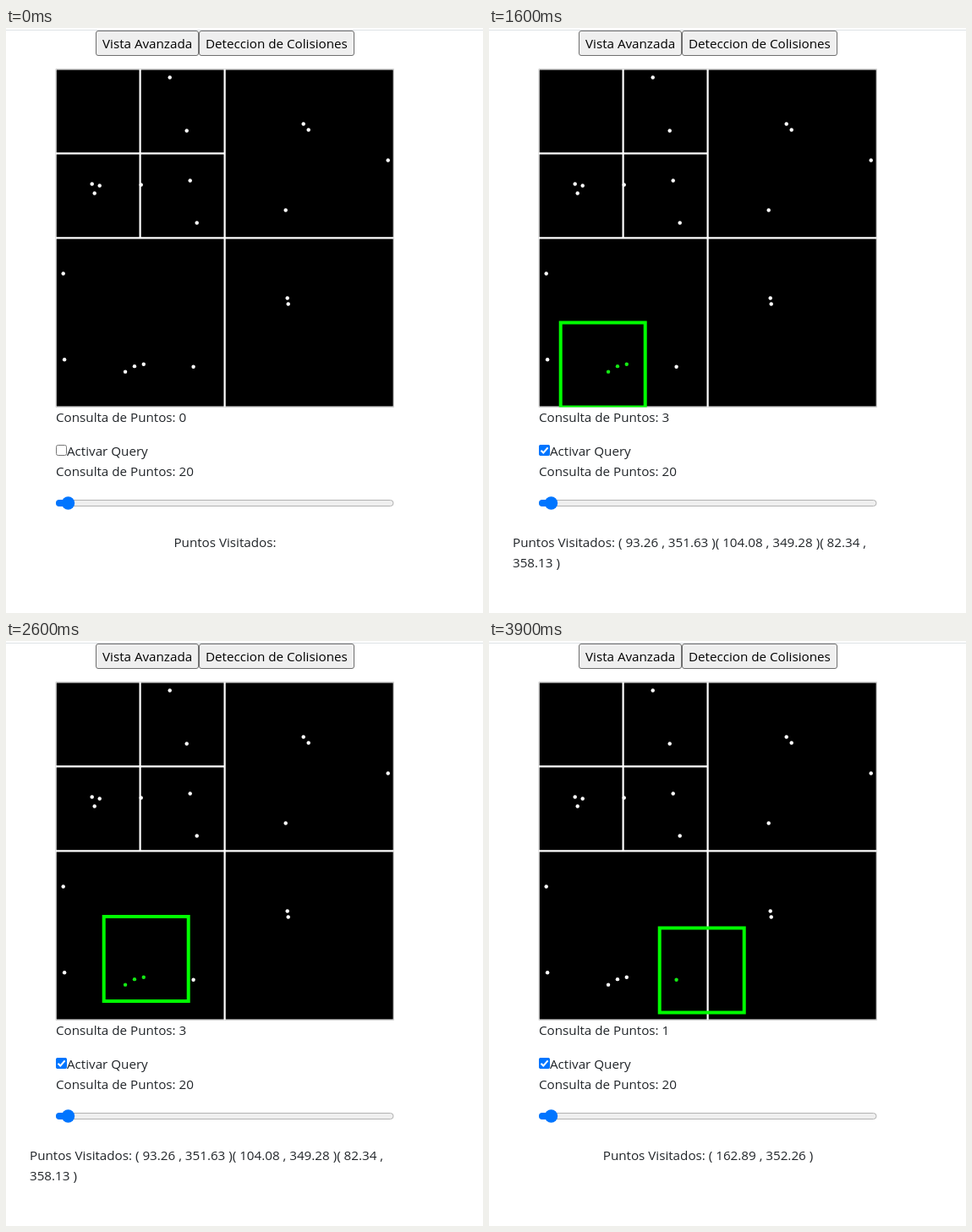
Write an HTML page that moves like this. It is 564 by 692 pixels and loops after 4 s.

```html
<!DOCTYPE html>
<html lang="es">
<head>
<meta charset="utf-8">
<title>Quadtree</title>
<style>
html, body { margin: 0; width: 100%; height: 100%; overflow: hidden; background: #fff; }
body { position: relative; font: 15.2px/24px "Open Sans", "Noto Sans", sans-serif; color: #212529; }
svg { position: absolute; left: 0; top: 0; }
svg text { fill: #212529; white-space: pre; }
svg .btn text { fill: #000; }
.btn rect { fill: #efefef; stroke: #6f6f6f; }
#visited { position: absolute; left: 28px; top: 596px; width: 462px; display: flex; justify-content: center; }
</style>
</head>
<body>
<svg width="564" height="692" viewBox="0 0 564 692">
  <path d="M0 2.5H564" stroke="#dee2e6"/>
  <g class="btn">
    <rect x="106.5" y="3.5" width="121" height="29" rx="2.5"/>
    <text x="114" y="24">Vista Avanzada</text>
    <rect x="228.5" y="3.5" width="183" height="29" rx="2.5"/>
    <text x="236" y="24">Deteccion de Colisiones</text>
  </g>

  <svg x="58.7" y="48.5" width="400" height="400">
    <g id="cells" stroke="#fff" stroke-width="2"></g>
    <g id="dots"></g>
    <rect id="query" width="100" height="100" fill="none" stroke="#0f0" stroke-width="4"/>
  </svg>

  <text id="count" x="59" y="466"></text>

  <rect x="59.5" y="493.5" width="12" height="12" rx="2" fill="#fff" stroke="#767676"/>
  <g id="check">
    <rect x="59" y="493" width="13" height="13" rx="2" fill="#0075ff"/>
    <path d="M61.5 499.7L64.3 502.5L69.6 496.3" fill="none" stroke="#fff" stroke-width="2"/>
  </g>
  <text x="72" y="506">Activar Query</text>
  <text x="59" y="530">Consulta de Puntos: 20</text>

  <rect x="59.5" y="558.5" width="398.5" height="7" rx="3.5" fill="#efefef" stroke="#b2b2b2"/>
  <rect x="59" y="558" width="16" height="8" rx="4" fill="#0075ff"/>
  <circle cx="73.5" cy="562" r="7.7" fill="#0075ff"/>
</svg>
<div id="visited"><span></span></div>

<script>
const LOOP = 4000, STEP = 100, SIZE = 400, HALF = 50, CAPACITY = 6;
const CHECK_AT = 400, QUERY_AT = 600;

// Stored points, in the order the tree reports them
const points = [
  [10.41, 343.81], [162.89, 352.26], [93.26, 351.63], [104.08, 349.28], [82.34, 358.13],
  [135, 10], [155, 73], [43, 136], [52, 138], [46, 147], [101, 137], [159, 132], [167, 182],
  [293, 65], [299, 72], [393, 108], [272, 167], [9, 242], [274, 271], [275, 278]
];

// Pointer turns: time, x, y
const path = [
  [400, 7, 451], [800, 16, 432], [1100, 38, 385], [1600, 76, 350],
  [2000, 88, 338.5], [2600, 107, 327.5], [3400, 154, 331], [3900, 193, 341]
];

const $ = id => document.getElementById(id);
const query = $("query"), check = $("check"), count = $("count");
const visited = $("visited").firstElementChild;

function add(parent, tag, attrs) {
  const node = document.createElementNS("http://www.w3.org/2000/svg", tag);
  for (const name in attrs) node.setAttribute(name, attrs[name]);
  return parent.appendChild(node);
}

// Draws a cell and quarters it while it holds too many points
function drawCell(x, y, size) {
  add($("cells"), "rect", { x, y, width: size, height: size });
  const inside = points.filter(([px, py]) =>
    px >= x && px < x + size && py >= y && py < y + size);
  if (inside.length <= CAPACITY) return;
  const half = size / 2;
  for (let i = 0; i < 4; i++) drawCell(x + i % 2 * half, y + (i >> 1) * half, half);
}

drawCell(0, 0, SIZE);
const dots = points.map(([cx, cy]) => add($("dots"), "circle", { cx, cy, r: 2.2 }));

function pointer(t) {
  const i = Math.max(1, path.findIndex(p => p[0] >= t));
  const [t0, x0, y0] = path[i - 1], [t1, x1, y1] = path[i];
  const k = (t - t0) / (t1 - t0);
  return [x0 + (x1 - x0) * k, y0 + (y1 - y0) * k];
}

function show(node, on) {
  node.style.display = on ? "" : "none";
}

function draw(t) {
  const active = t >= QUERY_AT;
  const [mx, my] = pointer(t);
  show(check, t >= CHECK_AT);
  show(query, active);
  query.setAttribute("x", mx - HALF);
  query.setAttribute("y", my - HALF);

  const found = points.filter(([x, y], i) => {
    const hit = active && Math.abs(x - mx) <= HALF && Math.abs(y - my) <= HALF;
    dots[i].setAttribute("fill", hit ? "#14ea14" : "#fff");
    return hit;
  });
  count.textContent = "Consulta de Puntos: " + found.length;
  visited.textContent = "Puntos Visitados: " +
    found.map(([x, y]) => `( ${x.toFixed(2)} , ${y.toFixed(2)} )`).join("");
}

const start = performance.now();
let last = -1;
function tick() {
  const t = Math.floor((performance.now() - start) % LOOP / STEP) * STEP;
  if (t !== last) draw(last = t);
  requestAnimationFrame(tick);
}
tick();
</script>
</body>
</html>
```
